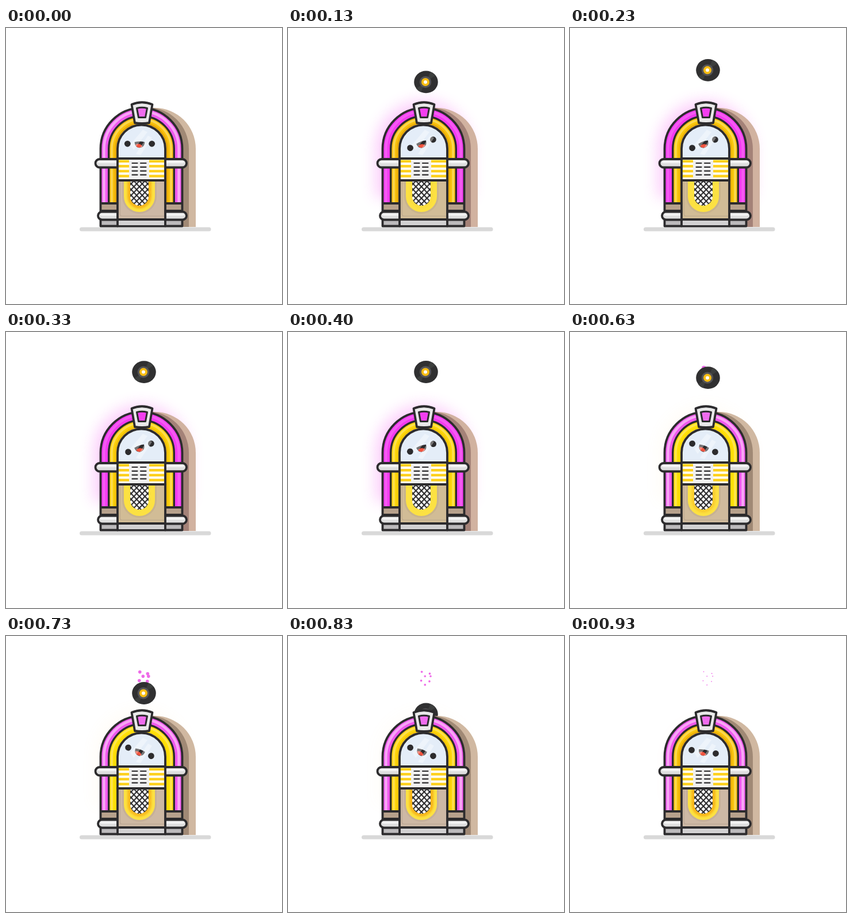
Animation, 480 px wide and 480 px high, one loop 960 ms. Source, as an HTML page:

```html
<!DOCTYPE html>
<html lang="en">
<head>
<meta charset="utf-8">
<title>Jukebox</title>
<style>
html, body { margin: 0; width: 100%; height: 100%; overflow: hidden; background: #fff; }
svg { display: block; width: 100vw; height: 100vh; }
.ink { stroke: #2c2b2d; stroke-width: 3.8; stroke-linejoin: round; stroke-linecap: round; }
.none { fill: none; }
</style>
</head>
<body>
<svg id="stage" viewBox="0 0 480 480"></svg>
<script>
const INK = '#2c2b2d', CX = 235.5, CY = 210;
const LOOP = 960, STEP = 100 / 3;

const arch = (r, bottom, shift = 0) =>
  `M${CX - r + shift} ${bottom}V${CY}a${r} ${r} 0 0 1 ${2 * r} 0V${bottom}`;
const band = (r, color, w, extra = '') =>
  `<path d="${arch(r, 305)}" fill="none" stroke="${color}" stroke-width="${w}" ${extra}/>`;
const rect = (x, y, w, h, fill, extra = '') =>
  `<rect x="${x}" y="${y}" width="${w}" height="${h}" fill="${fill}" ${extra}/>`;
const circle = (x, y, r, fill) => `<circle cx="${x}" cy="${y}" r="${r}" fill="${fill}"/>`;
const line = d => `<path d="${d}" class="ink none"/>`;
const repeat = (n, fn) => Array.from({ length: n }, (_, i) => fn(i)).join('');

// U shape around the grille, half as wide as w
const cup = (w, extra) => {
  const r = w / 2;
  return `<path d="M${232 - r} 266V293a${r} ${r} 0 0 0 ${w} 0V266Z" ${extra}/>`;
};
const bar = (x, y, h) =>
  rect(x, y, 314 - x, h, '#dedede', `rx="${h / 2}" class="ink"`) +
  rect(x + 4, y + 3, 306 - x, 4, '#f3f3f3', 'rx="2"');
const diamond = (x, y) => `M${x} ${y - 3.6}l3.3 3.6 -3.3 3.6 -3.3 -3.6Z`;
const corners = [0, 1, 2, 3].map(i => diamond(9.6 * (i & 1), 10 * (i >> 1))).join('');

const stripes = repeat(4, i => {
  const y = 229.5 + i * 8.6;
  return rect(196, y, 18, 4.5, '#fdd01c') + rect(249, y, 26, 4.5, '#fdd01c');
});
const dashes = repeat(4, i =>
  `<path d="M219.500 ${235 + i * 6.8}h9m5.500 0h9.500" stroke="${INK}" stroke-width="2.200" stroke-linecap="round"/>`);

const sparks = [[-6.5, -11], [7, -8], [-1, -3.5], [8.5, -3.5], [-7.5, 4], [6.5, 5.2], [-1, 11]];

document.getElementById('stage').innerHTML = `
<defs>
  <filter id="blur" x="-40%" y="-40%" width="180%" height="180%"><feGaussianBlur stdDeviation="12"/></filter>
  <filter id="soft"><feGaussianBlur stdDeviation="1.500"/></filter>
  <pattern id="grille" x="227.200" y="266" width="9.600" height="10" patternUnits="userSpaceOnUse">
    ${rect(0, 0, 9.6, 10, INK)}<path d="${diamond(4.8, 5)}${corners}" fill="#fff"/>
  </pattern>
  <clipPath id="glass"><path d="${arch(40, 225)}Z"/></clipPath>
</defs>
<path id="halo" d="${arch(84, 295)}Z" filter="url(#blur)"/>
<path d="M131.500 350H353" stroke="#d9d9d9" stroke-width="7" stroke-linecap="round"/>
<g id="sparks">${repeat(sparks.length, () => circle(0, 0, 0, '#ee6be8'))}</g>
<g id="disc">
  <ellipse cx="1" rx="20.800" ry="19.400" fill="#303031"/>
  <path d="M0 0L9 -17.500A20.800 19.400 0 0 1 17.500 -11.500ZM0 0L-8 17.500A20.800 19.400 0 0 1 -16 11.500Z" fill="#3c3e3d"/>
  ${circle(0, 0, 10.2, '#565557')}${circle(0, 0, 7, '#f8bd13')}${circle(0, 0, 3, '#fff')}
</g>
<path d="${arch(71, 346, 23.5)}Z" id="side"/>
<path d="${arch(72, 346, 10.5)}Z" id="shade"/>
<path d="${arch(71, 346)}Z" fill="#b29d8a"/>
${band(64, '', 12, 'id="pink"')}
${band(65, '#fbb9f8', 4.5, 'id="pale"')}
${band(49.5, '', 12, 'id="gold"')}
${band(51.5, '#ffe98a', 3.5, 'opacity=".55"')}
${band(45, '#c07800', 2.5, 'id="amber"')}
${band(56.8, INK, 3.4)}
${rect(166, 305, 139, 14, '#b7a18c')}
${line('M165 305H306M165 318H306')}
${rect(164.5, 333, 142, 11, '#bcbabc')}
${line(arch(71, 344.5) + 'Z')}
${bar(160, 319.5, 14)}
<path d="${arch(41.5, 227)}Z" fill="#e4edf8"/>
<g id="face">
  ${circle(-21.2, 0, 5.4, INK)}${circle(21.2, 0, 5.4, INK)}
  <path d="M-8.800 -3Q0 -5 8.800 -3C9 3 5 7 0 7S-9 3 -8.800 -3Z" fill="${INK}"/>
  <path d="M-7.500 2C-4 -1 3 0 5 5Q0 8 -4 6Q-6 4.500 -7.500 2Z" fill="#f2543f"/>
</g>
<path d="M216 203L238 177L246 181L222 212ZM226 219L247 187L254 191L234 221Z" clip-path="url(#glass)" fill="#fff" opacity=".35"/>
${line(arch(41.5, 227) + 'Z')}
${bar(155.5, 228, 14.5)}
${rect(194, 227, 83, 38, '#fff')}${stripes}
${rect(214, 228, 35, 36, '#f0f0f0')}${dashes}
${line('M194 227H277V265H194Z')}
<path id="panel" d="M194 265H277V333H194Z" class="ink"/>
<path d="M198 268V323Q198 327 202 327H275" fill="none" stroke="#a99683" stroke-width="1.200" opacity=".55"/>
${cup(60, 'fill="#8b7350" opacity=".13"')}
${cup(54, 'fill="#fce142"')}
${cup(42, 'id="ember" fill="#f8b312" filter="url(#soft)"')}
${cup(32, 'fill="url(#grille)"')}
${line('M194 265H277')}
${rect(196, 335, 79, 8, '#d2d1d2')}
${line('M194 334V344.500M277 334V344.500')}
<path d="M218.500 133Q236.500 125.500 254.500 133L249 165Q236.500 167 224 165Z" fill="#e9e9e9" class="ink"/>
<path d="M227.500 139.500Q236.500 137 245.500 139.500L242.500 155.500H230.500Z" id="gem" stroke="${INK}" stroke-width="3" stroke-linejoin="round"/>`;

const el = id => document.getElementById(id);
const set = (id, name, value) => el(id).setAttribute(name, value);
const dots = [...el('sparks').children];

const ease = (t, a, b) => {
  const k = Math.min(1, Math.max(0, (t - a) / (b - a)));
  return k * k * (3 - 2 * k);
};
const pulse = (t, a, b, c, d) => ease(t, a, b) - ease(t, c, d);
const mix = (a, b, k) => `rgb(${a.map((v, i) => Math.round(v + (b[i] - v) * k))})`;

// The head leans left for half the loop, then right
const SWING = 108;
function lean(t) {
  const side = 2 * (ease(t, -SWING, SWING) - ease(t, LOOP / 2 - SWING, LOOP / 2 + SWING)
    + ease(t, LOOP - SWING, LOOP + SWING)) - 1;
  return -20 * side;
}

function draw(t) {
  const pink = pulse(t, 0, 130, 400, 570);
  const lamp = pulse(t, 0, 160, 480, 800);
  const gold = pulse(t, 80, 600, 730, 980);
  const warm = ease(t, 400, 560);

  set('halo', 'fill', mix([244, 90, 240], [255, 205, 110], warm));
  set('halo', 'opacity', .28 * pink + .05 * gold * warm);
  set('side', 'fill', mix([208, 184, 161], [209, 178, 160], pink));
  set('shade', 'fill', mix([160, 137, 117], [164, 130, 120], pink));
  set('panel', 'fill', mix([205, 184, 165], [209, 188, 150], lamp));
  set('gem', 'fill', mix([240, 108, 238], [243, 62, 240], pink));
  set('pink', 'stroke', mix([240, 88, 238], [243, 58, 241], pink));
  set('pale', 'opacity', .8 - .55 * pink);
  set('gold', 'stroke', mix([248, 192, 12], [255, 225, 8], gold));
  set('amber', 'opacity', .35 - .28 * gold);
  set('ember', 'opacity', .9 * (1 - lamp));
  set('face', 'transform', `translate(232.500 201.300) rotate(${lean(t)})`);

  // The disc shoots up, hangs, then drops back behind the top
  const s = (t - 400) / 1000;
  const y = 69.5 + (s < 0 ? 4600 * s ** 4 : 835 * s ** 3);
  set('disc', 'transform', `translate(239 ${Math.min(y, 157)})`);
  set('disc', 'visibility', t < 30 ? 'hidden' : 'visible');

  const r = t < 570 ? 0 : 2.8 * (1020 - t) / 290;
  const spread = 1 + .05 * ease(t, 700, LOOP);
  dots.forEach((d, i) => {
    d.setAttribute('cx', 239.3 + sparks[i][0] * spread);
    d.setAttribute('cy', 73.6 + sparks[i][1] * spread);
    d.setAttribute('r', r);
  });
}

function tick(now) {
  const step = Math.min(28, Math.floor((now % LOOP + 3.4) / STEP));
  draw(Math.round(step * STEP / 10) * 10);
  requestAnimationFrame(tick);
}
draw(0);
requestAnimationFrame(tick);
</script>
</body>
</html>
```
